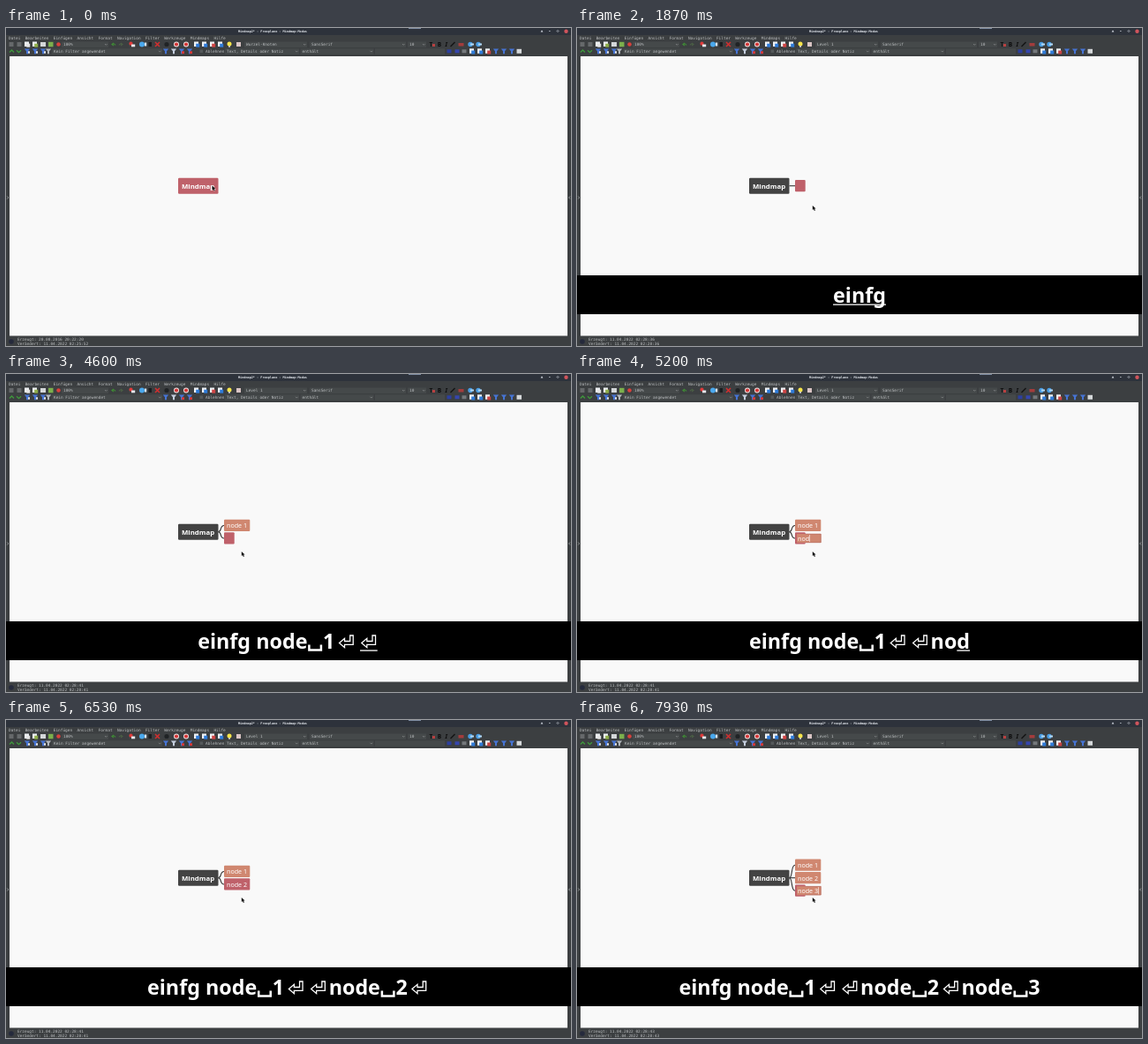
An HTML page with a canvas for the animation above (8 s loop, 640 by 360 pixels).

```html
<!DOCTYPE html>
<html lang="de">
<head>
<meta charset="utf-8">
<title>Mindmap</title>
<style>
html, body { margin: 0; width: 100%; height: 100%; overflow: hidden; background: #3c3f41; }
canvas { display: block; }
</style>
</head>
<body>
<canvas id="stage" width="640" height="360"></canvas>
<script>
const ctx = document.getElementById('stage').getContext('2d');
const LOOP = 8000, CREATE = 1870;
const RED = '#bf616a', CORAL = '#d08770', DARK = '#434343';
const MONO = '"DejaVu Sans Mono", monospace', SANS = '"Noto Sans", sans-serif';

// Keystrokes: symbol, press time, release time
const keys = [
  ['einfg ', 1870, 2070],
  ['n', 2930, 3070], ['o', 3070, 3200], ['d', 3200, 3330], ['e', 3330, 3470],
  ['␣', 3530, 3670], ['1', 3730, 3870], ['⏎', 4070, 4270], ['⏎', 4530, 4670],
  ['n', 4870, 5000], ['o', 5000, 5130], ['d', 5130, 5270], ['e', 5330, 5400],
  ['␣', 5530, 5670], ['2', 5730, 5870], ['⏎', 6070, 6200],
  ['n', 7200, 7330], ['o', 7330, 7400], ['d', 7530, 7600], ['e', 7600, 7670],
  ['␣', 7730, 7800], ['3', 7830, 7930]
];
// Nodes: created, editing begins, editing ends
const nodes = [[1870, 2930, 4130], [4530, 4870, 6130], [6670, 7200, LOOP]];
// Clock seconds shown in the status bar
const stamps = [[1870, 36], [3070, 38], [4530, 41], [6670, 43]];

function box(x, y, w, h, color, radius = 0) {
  ctx.fillStyle = color;
  ctx.beginPath();
  ctx.roundRect(x, y, w, h, radius);
  ctx.fill();
}

function label(text, x, y, font, color = '#bcbfc1') {
  ctx.font = font;
  ctx.fillStyle = color;
  ctx.fillText(text, x, y);
}

const small = (text, x, y, color) => label(text, x, y, `4.45px ${MONO}`, color);

function stroke(path, color, width) {
  ctx.strokeStyle = color;
  ctx.lineWidth = width;
  ctx.stroke(new Path2D(path));
}

function combo(x, y, w, text) {
  box(x, y - 3, w, 6.4, '#45494a');
  small(text, x + 2, y + 1.5);
  stroke(`M${x + w - 4} ${y - .5}l1.3 1.3 1.3-1.3`, '#9a9c9e', .6);
}

function funnel(x, y, color) {
  ctx.fillStyle = color;
  ctx.fill(new Path2D(`M${x - 3.2} ${y - 2.8}h6.4l-2.2 2.8v3h-2v-3z`));
}

function sheet(x, y, color) {
  box(x - 3, y - 3, 5, 5.5, '#eef1f4');
  box(x - .8, y - .8, 4, 4, color);
}

function dot(x, y, color, r = 2.4) {
  box(x - r, y - r, 2 * r, 2 * r, color, r);
}

function drawWindow(t) {
  box(0, 0, 640, 360, '#3c3f41');
  box(0, 0, 640, 8, '#2d323b');
  box(456, 0, 14, 1, '#7f8da3');
  label('Mindmap2* - Freeplane - Mindmap-Modus', 263, 5, `bold 3.5px ${MONO}`, '#e4e8ee');
  stroke('M606 4.2l1-1.4 1 1.4zM615 3.5h1.6M624 3.5l1-1 1 1-1 1z', '#c5cad2', .8);
  dot(634.5, 3.7, '#d0545c', 2.2);
  small('Datei  Bearbeiten  Einfügen  Ansicht  Format  Navigation  Filter  Werkzeuge  Mindmaps  Hilfe', 3, 12.7);

  const y1 = 18.5, y2 = 26.3;
  [6, 15].forEach(x => box(x - 2.5, y1 - 2.5, 5, 5, '#66696b'));
  sheet(24, y1, '#e4e4e4');
  sheet(33, y1, '#8fae4a');
  box(39, y1 - 2.5, 6, 5, '#d4d7d9');
  box(48, y1 - 2.7, 5.5, 5.5, '#7cb04c');
  dot(59.5, y1, '#d9413c', 2.3);
  combo(63, y1, 53, '100%');
  stroke('M124 19.5q-1-2.5-4-1m2-1.5l-2 1.5 2 1.5', '#3f8a35', 1.2);
  stroke('M128 19.5q1-2.5 4-1m-2-1.5l2 1.5-2 1.5', '#4b5f45', 1.1);
  dot(141.5, y1 - .8, '#df3b3b', 2.1);
  box(142, y1, 4.2, 2.8, '#e6e9ed');
  dot(154, y1, '#4aa8ec', 3);
  box(157, y1 - 2, 2.2, 4, '#d5e0e8');
  box(161.5, y1 - 2.5, 3.5, 5, '#1b1d1f');
  stroke('M169 16l5 5m0-5l-5 5', '#d02f2f', 1.6);
  dot(182, y1, '#202325', 2.6);
  [193, 204].forEach(x => {
    dot(x, y1, '#f0e4e4', 3);
    dot(x, y1, '#d23636', 2.1);
  });
  [216, 225, 234, 243].forEach((x, i) => sheet(x, y1, i === 2 ? '#cf4545' : '#2f7bd8'));
  dot(253, y1 - .5, '#f9e64a', 2.5);
  box(252, y1 + 1.6, 2, 1.6, '#ccc');
  box(261, y1 - 2.5, 5, 5, '#d9c4c4');
  combo(270, y1, 71, t < CREATE ? 'Wurzel-Knoten' : 'Level 1');
  combo(344, y1, 109, 'SansSerif');
  combo(455, y1, 21, '10');
  label('T', 479.5, 20.8, `bold 6.5px ${SANS}`, '#111');
  box(483, y1 - .5, 3, 3, '#b84040');
  label('B', 488.8, 20.8, `bold 6.5px ${SANS}`, '#0c0c0c');
  label('I', 497.5, 20.8, `italic bold 6.5px ${SANS}`, '#0c0c0c');
  stroke('M503.5 21l5-5', '#141414', 1.5);
  box(512.5, y1 - 1.5, 6, 3.5, '#a33c3c');
  [526, 535].forEach(x => { dot(x, y1, '#4a9ee4', 2.7); box(x, y1 - 1, 4, 2, '#b4d8f2'); });

  stroke('M4 27.5l2.5-2.5 2.5 2.5M12 25.2l2.5 2.5 2.5-2.5', '#3f9a3c', 1.3);
  [24, 33, 42].forEach(x => { funnel(x, y2, '#4674d4'); box(x + 1, y2, 2, 2.5, '#dfe4ec'); });
  funnel(48, y2, '#b4b9be');
  combo(52, y2, 125, 'Kein Filter angewendet');
  [181, 190, 199, 208].forEach((x, i) => {
    funnel(x, y2, i === 1 ? '#c4cedd' : '#4674d4');
    if (i > 1) box(x, y2, 3, 2.8, '#d63a3a');
  });
  box(219.5, y2 - 1.8, 3.6, 3.6, '#55595b');
  small('Ablehnen', 226, 27.8);
  combo(248, y2, 84, 'Text, Details oder Notiz');
  combo(333.5, y2, 83, 'enthält');
  box(418, y2 - 3, 79, 6.4, '#45494a');
  [502, 511, 519].forEach((x, i) => box(x - 2.5, y2 - 2, 5, 4, ['#2c3fa0', '#3546ae', '#75797c'][i]));
  [528, 537, 546].forEach((x, i) => sheet(x, y2, i === 2 ? '#c94343' : '#2f7bd8'));
  [555, 564, 573].forEach(x => funnel(x, y2, '#4674d4'));
  box(578.5, y2 - 2.5, 5.5, 5, '#d5d8da');

  box(4, 32, 632, 316.5, '#f9f9f9');
  stroke('M1.3 190.5l1.5 1.5-1.5 1.5M639 190.5l-1.5 1.5 1.5 1.5', '#b5b8ba', .7);

  const stamp = stamps.filter(s => t >= s[0]).pop();
  const time = stamp && `11.04.2022 02:28:${stamp[1]}`;
  dot(6, 355, '#252a3c', 2.8);
  small('Erzeugt: ' + (time || '20.08.2016 20:22:20'), 13, 354);
  small('Verändert: ' + (time || '11.04.2022 02:25:52'), 13, 359.2);
}

// Text entered so far between two times
const typed = (t, from, to) => keys
  .filter(([k, at]) => at >= from && at < to && at <= t && k !== '⏎')
  .map(([k]) => k === '␣' ? ' ' : k).join('');

function drawMap(t) {
  const shown = nodes.filter(n => t >= n[0]);
  shown.forEach(([, begin, end], i) => {
    const y = 178.7 + (i - (shown.length - 1) / 2) * 14.5;
    const editing = t >= begin && t < end;
    const last = i === shown.length - 1;
    const text = typed(t, begin, end);
    const done = t >= end;
    stroke(`M240.5 178.7C244.5 178.7 242 ${y} 247 ${y}`, '#333', 1.1);
    box(247, y - 6.6, done ? 29.3 : 11.7, 13.2, last ? RED : CORAL, 1);
    if (editing) {
      box(249, y - 5, 27.5, 10, CORAL);
      stroke(`M258.5 ${y - 4.8}h17.7v9.6h-17.7`, '#b0665c', .6);
    }
    const font = `7.1px ${SANS}`;
    label(text, 250, y + 2.8, font, '#fff');
    if (editing) box(250.3 + ctx.measureText(text).width, y - 4, .7, 8, '#fbe9e4');
  });
  box(195, 169.7, 45.5, 18, t < CREATE ? RED : DARK, 1.2);
  label('Mindmap', 199, 181.8, `bold 7.8px ${SANS}`, '#fff');
}

function drawPointer(t) {
  const p = Math.min(1, Math.max(0, (t - 620) / 310));
  const e = p * p * (3 - 2 * p);
  const arrow = new Path2D('M0 0v5l1.2-1 .9 1.9 1-.5-.9-1.8h1.6z');
  ctx.save();
  ctx.translate(233.5 + 33.3 * e, 178.5 + 22.5 * e);
  ctx.strokeStyle = '#fff';
  ctx.lineWidth = .7;
  ctx.stroke(arrow);
  ctx.fillStyle = '#111';
  ctx.fill(arrow);
  ctx.restore();
}

function drawKeys(t) {
  const pressed = keys.filter(k => t >= k[1]);
  if (!pressed.length) return;
  box(0, 280, 640, 44, '#000');
  const font = `bold 23.3px ${SANS}`;
  ctx.font = font;
  const line = pressed.length > 1 ? pressed : [['einfg', ...pressed[0].slice(1)]];
  const widths = line.map(([k]) => k === '⏎' ? 25.3 : k === '␣' ? 17.5 : ctx.measureText(k).width);
  let x = 320 - widths.reduce((a, b) => a + b) / 2;
  line.forEach(([k, , release], i) => {
    const w = widths[i], inset = k === '⏎' ? 3.5 : 0;
    if (k === '⏎') {
      stroke(`M${x + 5.3} 304.5l6-5.2v3.2h6.2v-6.5h3.5v10.3h-9.7v3.4z`, '#fff', 1.3);
    } else if (k === '␣') {
      stroke(`M${x + 2} 306.5v6h13.5v-6`, '#fff', 2.5);
    } else {
      label(k, x, 311, font, '#fff');
    }
    if (t < release) box(x + inset, 312.4, w - inset * 1.6, 1.3, '#fff');
    x += w;
  });
}

function frame() {
  const t = performance.now() % LOOP;
  drawWindow(t);
  drawMap(t);
  drawPointer(t);
  drawKeys(t);
  requestAnimationFrame(frame);
}
frame();
</script>
</body>
</html>
```
